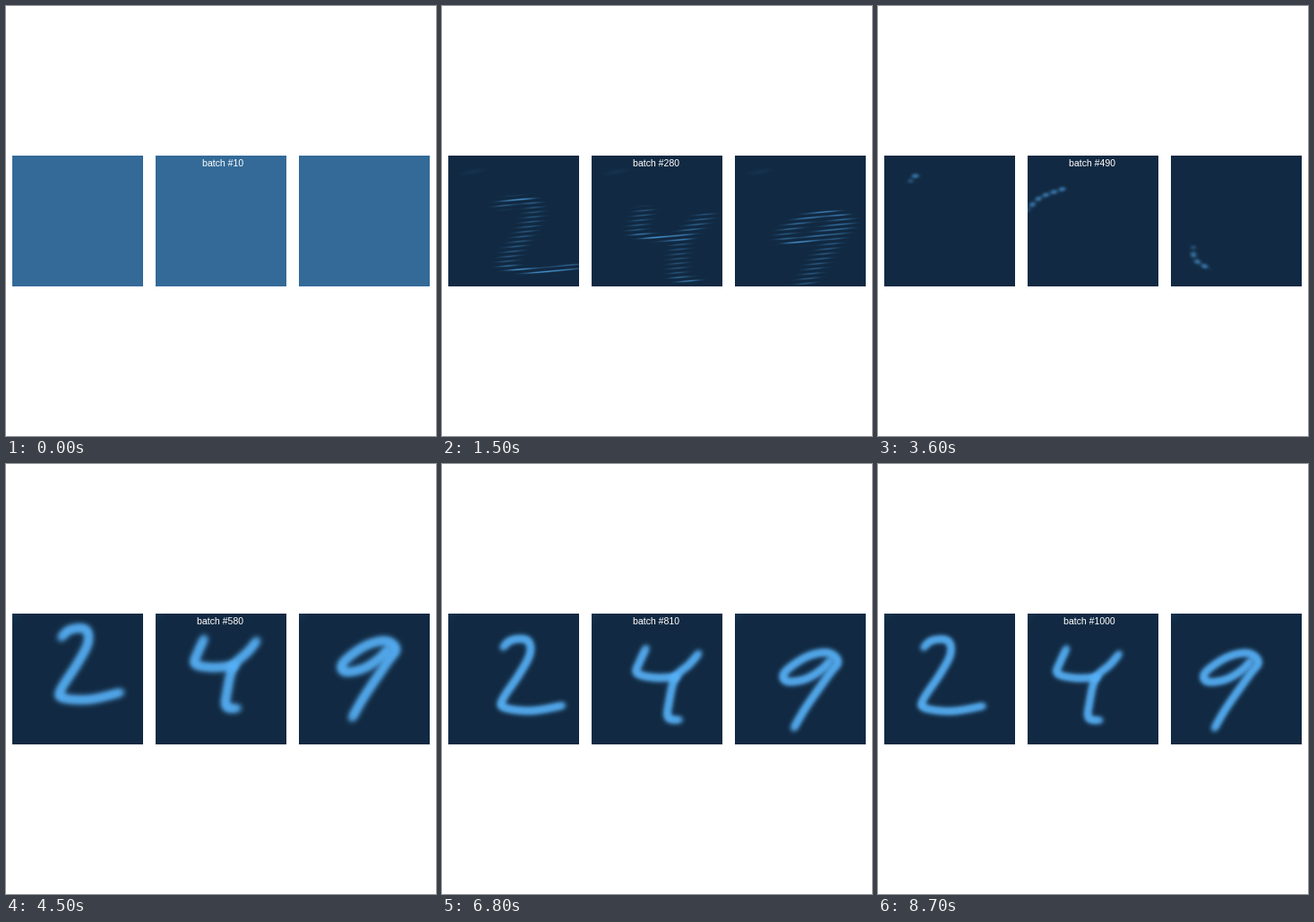
These frames come from a looping animation (480 by 480 pixels, 8.8 s). A matplotlib script:

```python
import numpy as np
import matplotlib.pyplot as plt
from matplotlib.animation import FuncAnimation
from matplotlib.colors import LinearSegmentedColormap

STAGE, SIDE, TOP = 480, 146, 167
FRAMES, STEP = 88, 100
MID = SIDE / 2

blues = LinearSegmentedColormap.from_list("blues", ["#112942", "#336A98", "#56B1F7"])
AXIS = np.arange(SIDE) + 0.5
X, Y = np.meshgrid(AXIS, AXIS)


def curve(*keys, n=14):
    """Smooth curve through a few key points."""
    p = np.array((keys[0],) + keys + (keys[-1],), float)
    t = np.linspace(0, 1, n, endpoint=False)[:, None]
    parts = [b + 0.5 * t * (c - a + t * (2 * a - 5 * b + 4 * c - d + t * (3 * (b - c) + d - a)))
             for a, b, c, d in zip(p, p[1:], p[2:], p[3:])]
    return np.vstack(parts + [p[-1:]])


TWO = [curve((43, 39), (53, 30), (71, 30), (74, 45), (62, 68),
             (44, 95), (44, 105), (75, 109), (111, 103))]
FOUR = [curve((44, 38), (36, 55), (33, 67), (54, 72), (78, 71)),
        curve((103, 44), (92, 57), (76, 72), (69, 100), (68, 117), (82, 119))]
NINE = [curve((90, 52), (78, 64), (60, 74), (40, 76), (38, 66), (62, 49),
              (86, 44), (98, 54), (88, 68), (62, 105), (48, 129))]
DIGITS = (TWO, FOUR, NINE)

FRAGMENTS = (curve((29, 29), (33, 23), (41, 23)),
             curve((0, 61), (14, 47), (40, 37)),
             curve((25, 102), (27, 116), (44, 127)))


def ramp(k, start, end):
    t = np.clip((k - start) / (end - start), 0, 1)
    return t * t * (3 - 2 * t)


def ink(pts, bx, by, power=1):
    """Line blurred by bx across and by down, as a sum of soft dots."""
    length = np.hypot(*np.gradient(pts, axis=0).T) * power
    gx = np.exp(-((AXIS - pts[:, :1]) / bx) ** 2)
    gy = np.exp(-((AXIS - pts[:, 1:]) / by) ** 2)
    return (gy * length[:, None]).T @ gx / (bx * np.sqrt(np.pi))


def place(pts, dx, dy, scale=1, lean=0, tilt=0):
    x, y = (pts - MID).T
    return np.column_stack([scale * x + lean * y + dx, y + tilt * x + dy]) + MID


def striped(strokes, k):
    """Smeared digit that shows only through thin slanted lines."""
    bx = 9 + 20 * np.exp(-k / 6)
    field = sum(ink(place(s, 25, 20, 1.15, 0.12), bx, 3) for s in strokes)
    wave = np.cos(np.pi * (Y + 0.09 * X - 4.2) / 5.2) ** 6
    streak = 0.07 * np.exp(-((X - 28) / 14) ** 2 - ((Y - 18 + 0.15 * (X - 28)) / 3) ** 2)
    return np.tanh(1.1 * field) * wave + streak


def beaded(pts):
    """Short row of specks."""
    along = np.cumsum(np.hypot(*np.gradient(pts, axis=0).T))
    return 0.75 * np.tanh(1.6 * ink(pts, 3.4, 2.6, np.cos(np.pi * along / 9.5) ** 4))


def settled(strokes, k):
    """Clear digit that drops into place and drifts left."""
    rest = np.exp((45 - max(k, 41)) / 7)
    blur = 4.4 + 0.9 * np.exp((45 - k) / 15)
    dx = 19 * np.sin(np.pi * (87 - k) / 52)
    field = sum(ink(place(s, dx, -13 * rest, tilt=-0.06 * rest), blur, blur) for s in strokes)
    return np.tanh(1.5 * field) + 0.06 * np.exp(-(X ** 2 + Y ** 2) / 90)


def panel(i, k):
    if k == 0:
        return np.full((SIDE, SIDE), 0.5)
    field = np.zeros((SIDE, SIDE))
    if k < 30:
        field += ramp(k, -4, 12) * (1 - ramp(k, 19, 30)) * striped(DIGITS[i], k)
    if 26 < k < 41:
        field += ramp(k, 26, 34) * (1 - ramp(k, 36, 41)) * beaded(FRAGMENTS[i])
    if k > 36:
        field += ramp(k, 36, 42) * settled(DIGITS[i], k)
    return np.clip(field, 0, 1)


fig = plt.figure(figsize=(4.8, 4.8), dpi=100, facecolor="white")
ax = fig.add_axes([0, 0, 1, 1])
images = [ax.imshow(np.zeros((SIDE, SIDE)), cmap=blues, vmin=0, vmax=1,
                    interpolation="nearest", aspect="auto",
                    extent=(x, x + SIDE, TOP + SIDE, TOP)) for x in (7, 167, 327)]
ax.set_xlim(0, STAGE)
ax.set_ylim(STAGE, 0)
ax.axis("off")
label = ax.text(265, 178.8, "", color="white", ha="right", va="baseline",
                family="Liberation Sans", fontsize=7.6)


def draw(k):
    for i, im in enumerate(images):
        im.set_data(panel(i, k))
    label.set_text(f"batch #{130 + 10 * k if k else 10}")
    return images + [label]


anim = FuncAnimation(fig, draw, frames=FRAMES, interval=STEP, repeat=True,
                     repeat_delay=0, init_func=lambda: draw(0))
plt.show()
```
